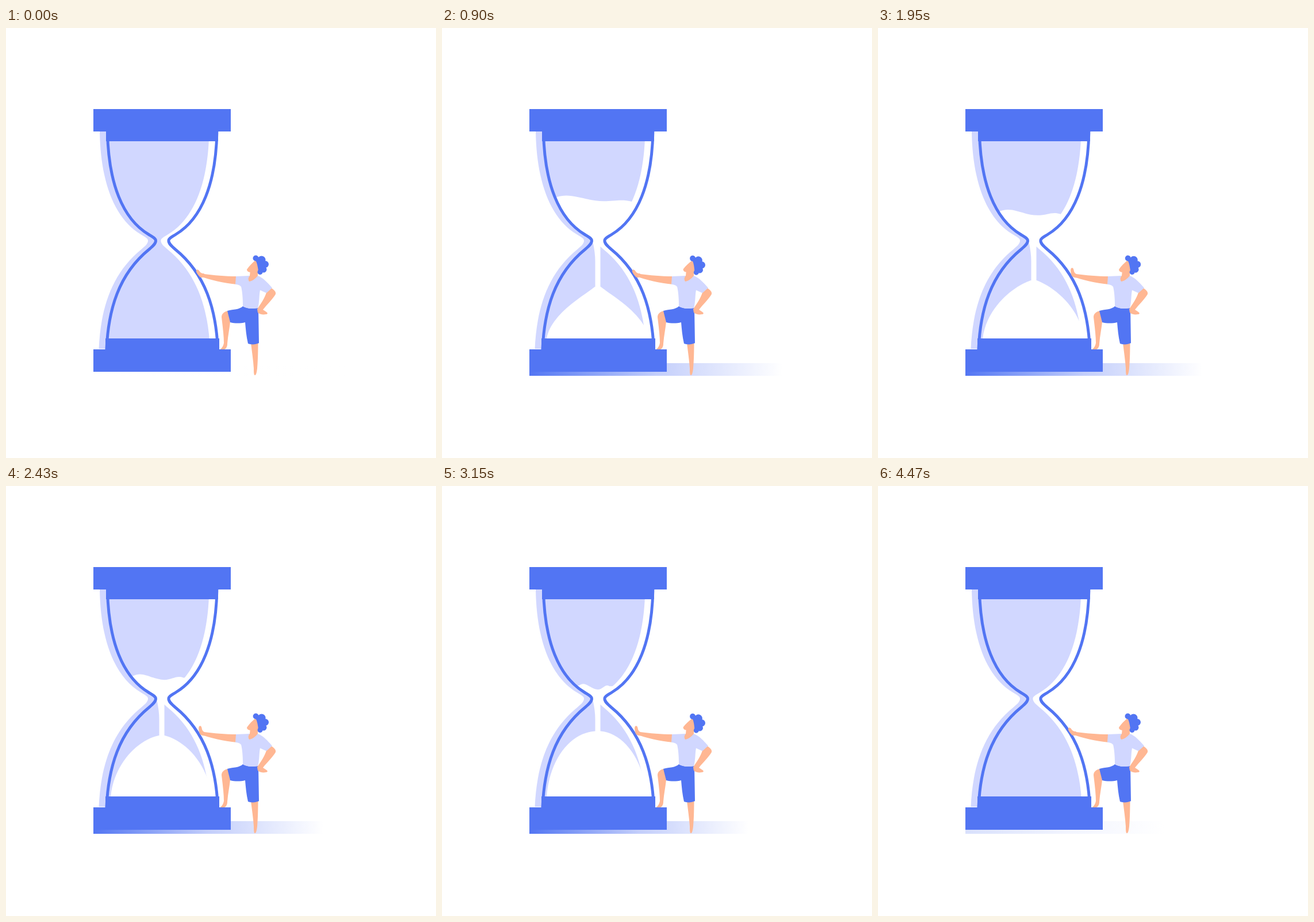
An HTML page that plays this animation: 748x748 px, repeating every 4500 ms.

```html
<!DOCTYPE html>
<html lang="en">
<head>
<meta charset="utf-8">
<title>Hourglass</title>
<style>
html, body { margin: 0; width: 100%; height: 100%; overflow: hidden; background: #fff; }
svg { display: block; width: 100%; height: 100%; }
.blue { fill: #5275f3; }
.lilac { fill: #d1d7ff; }
.skin { fill: #ffb793; }
.sand { fill: #fff; }
</style>
</head>
<body>
<svg viewBox="0 0 748 748">
  <defs>
    <linearGradient id="fade">
      <stop offset="0" stop-color="#5275f3"/>
      <stop offset=".08" stop-color="#6484f4"/>
      <stop offset=".5" stop-color="#c3cefb"/>
      <stop offset="1" stop-color="#fff"/>
    </linearGradient>
    <path id="glass" d="M176.500 180C178 270 203 332 248 359C256 364 260.500 366 260.500 370C260.500 375 256 379 249 385C196 428 178 490 175 558H368.400C365.400 490 347.400 428 294.400 385C287.400 379 282.900 375 282.900 370C282.900 366 287.400 364 295.400 359C340.400 332 365.400 270 366.900 180Z"/>
    <clipPath id="inside"><use href="#glass"/></clipPath>
  </defs>

  <rect id="shadow" x="152" y="583" height="22" fill="url(#fade)"/>

  <use href="#glass" fill="#fff"/>
  <use href="#glass" class="lilac" x="-13.500"/>
  <g clip-path="url(#inside)">
    <!-- bright strip along the right wall -->
    <g id="sand" class="sand">
      <path id="top"/>
      <path id="stream"/>
      <path id="pile"/>
    </g>
  </g>
  <use href="#glass" fill="none" stroke="#5275f3" stroke-width="5"/>
  <g class="blue">
    <rect x="152" y="141" width="239" height="39"/>
    <rect x="174" y="179" width="195" height="18"/>
    <rect x="173" y="540" width="198" height="20"/>
    <rect x="152" y="559" width="239" height="39"/>
  </g>

  <g class="skin">
    <path d="M386 492C378 494 375 498 375 503C377 520 379 535 379 548C378 553 376 556 373 559H380C384 557 385 553 385 549C386 535 389 522 390 511Z"/>
    <path d="M426 548H438.500C438.500 565 438 580 437 592C436 600 435 604 433 604C431 604 431 598 431 592C430 578 428 564 426 548Z"/>
    <path d="M402 432C380 432 362 430 345 428L338 432C355 438 378 444 402 446Z"/>
    <path id="hand" d="M336 418C338 416 340 418 340.500 421C341 424 342 427 346 428.500L345 434.500C341 434 338 433 337 431C336 427 334 421 336 418Z"/>
  </g>
  <path class="blue" d="M412 484C420 489 430 488 439 487L440 548C434 551 426 551 421 549C418 536 417 524 416 512C408 514 398 514 390 512L385 492C396 489 406 490 412 484Z"/>
  <path class="skin" d="M461 452C467 456 470 459 469 463C463 473 453 482 447 490L453 494C456 496 455 498 452 498C447 499 441 498 438 495L437 489C443 480 450 470 453 460Z"/>
  <path class="lilac" d="M400 432L424 431L438 431C447 434 456 444 463 452L453 461L442 456C440 466 441 478 438 487C430 489 418 488 412 484C412 470 411 458 409 450C406 447 403 446 399 446Z"/>
  <path class="skin" d="M425 421L424 431C421 434 421 438 423 441C429 440 434 436 438 431L438 421Z"/>
  <g id="head">
    <path class="skin" d="M434 404C428 409 423 414 419 420C419 424 423 425 427 425L438 427L441 407Z"/>
    <g class="blue">
      <circle cx="434.500" cy="400.500" r="5"/>
      <circle cx="444.500" cy="403.500" r="7"/>
      <circle cx="451" cy="411" r="6"/>
      <circle cx="448" cy="420" r="5.500"/>
      <circle cx="442" cy="424.500" r="4.500"/>
      <path d="M434 404C437 409 438 416 439 423L449 419L451 410L442 402Z"/>
    </g>
  </g>
</svg>
<script>
const LOOP = 4500;
const el = id => document.getElementById(id);
const clamp = v => Math.max(0, Math.min(1, v));
const ramp = (t, a, b) => clamp((t - a) / (b - a));
const ease = v => v * v * (3 - 2 * v);
const mix = (a, b, k) => a + (b - a) * k;
const set = (id, name, value) => el(id).setAttribute(name, value);

// Wavy surface of the upper sand, narrowing as it sinks
function topPath(t) {
  const level = 276 + 0.0235 * t;
  const d = level - 297;
  const left = Math.min(266, 199 + 0.35 * d + 0.0075 * d * d);
  const width = 530 - 2 * left;
  const end = 5 - (t - 900) * 0.003;
  const p = (u, dy) => `${left + u * width} ${level + dy}`;
  return `M150 ${level - 1}L${p(0, -3)}C${p(0.2, -12)} ${p(0.38, 4)} ${p(0.62, 4)}` +
    `C${p(0.78, 4)} ${p(0.86, end - 5)} ${p(1, end)}L390 ${level + end}` +
    `L390 ${Math.max(372, level + 8)}H150Z`;
}

// Heap that swells from a cone into a dome
function pilePath(t) {
  const peak = 459.5 - 0.0105 * t;
  const k = (t - 900) / 2940;
  const m = (a, b) => mix(a, b, k);
  const low = peak + m(17, -1);
  return `M182 540C${m(190, 186)} ${m(497, 470)} ${m(245, 215)} ${low} 266 ${peak}H276` +
    `C${m(297, 318)} ${low} ${m(352, 348)} ${m(497, 462)} ${m(360, 356)} 540Z`;
}

function draw(t) {
  set("top", "d", topPath(t));
  set("pile", "d", pilePath(t));
  set("stream", "d", `M259 370L263 375C265 385 266.500 395 266.500 406V${470 - 0.0105 * t}H275.500V370Z`);
  set("sand", "opacity", ramp(t, 0, 400) * (1 - ramp(t, 4300, 4450)));

  set("shadow", "width", 463 - 0.026 * t);
  set("shadow", "opacity", ramp(t, 0, 450) * (1 - ramp(t, 4335, 4510)) * ramp(LOOP - t, -10, 0));

  const lift = ease(ramp(t, 950, 1400)) * (1 - ease(ramp(t, 3250, 3750)));
  set("hand", "transform", `rotate(${-26 * (1 - lift)} 342 431)`);
  const nod = Math.sin(Math.PI * t / 2250) ** 2;
  set("head", "transform", `rotate(${3.5 * nod} 430 430)`);
}

const start = performance.now();
function tick() {
  draw((performance.now() - start) % LOOP);
  requestAnimationFrame(tick);
}
tick();
</script>
</body>
</html>
```
